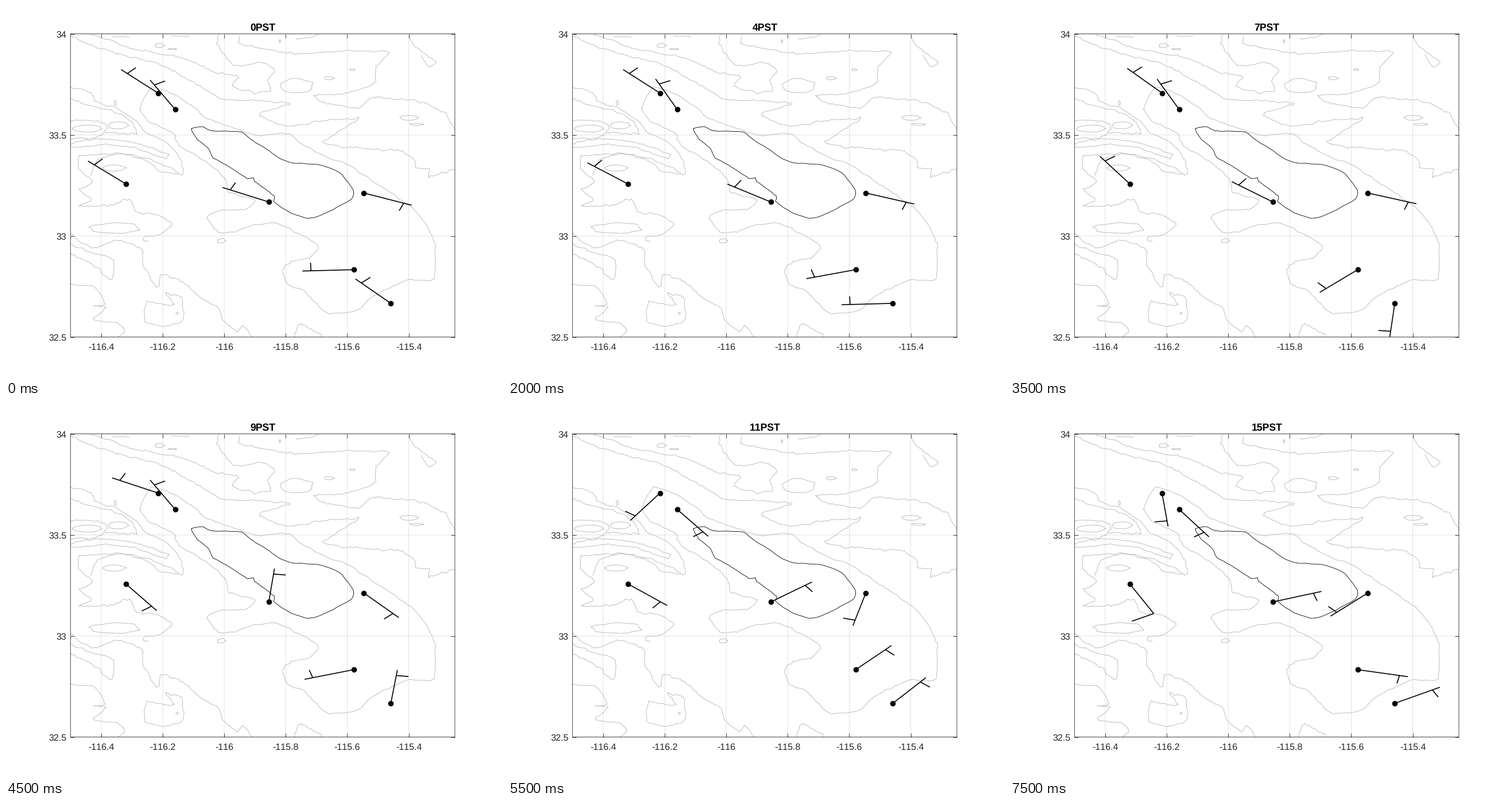
These frames come from a looping animation (864x648 px, 8000 ms). A matplotlib script:

```python
import numpy as np
import matplotlib.pyplot as plt
from matplotlib.animation import FuncAnimation

W, H, DPI = 864, 648, 100
PX = 72 / DPI
LEFT, BOTTOM, WIDE, TALL = 0.13, 0.11, 0.775, 0.815
WEST, EAST, SOUTH, NORTH = -116.5, -115.25, 32.5, 34
HOURS = 16
SHAFT = 1 / 6
THIN = 0.85 * PX
INK, GRAY = "0.15", "0.7"

plt.rcParams.update({"font.family": "Liberation Sans", "text.hinting": "none",
                     "text.kerning_factor": 6, "axes.unicode_minus": False})
rng = np.random.default_rng(4)

fig = plt.figure(figsize=(W / DPI, H / DPI), dpi=DPI, facecolor="white")
ax = fig.add_axes([LEFT, BOTTOM, WIDE, TALL])
ax.set(xlim=(WEST, EAST), ylim=(SOUTH, NORTH))


def to_degrees(points):
    x, y = points.T
    return (WEST + (x / W - LEFT) / WIDE * (EAST - WEST),
            SOUTH + (1 - y / H - BOTTOM) / TALL * (NORTH - SOUTH))


def to_pixels(lon, lat):
    return (W * (LEFT + (lon - WEST) / (EAST - WEST) * WIDE),
            H * (1 - BOTTOM - (lat - SOUTH) / (NORTH - SOUTH) * TALL))


def smooth(p, closed, step=6, pull=0.3):
    """Hermite curve through the points p, sampled about every step pixels."""
    p = np.vstack([p[-1], p, p[:2]] if closed else [p[0], p, p[-1]])
    parts = []
    for a, b, c, d in zip(p, p[1:], p[2:], p[3:]):
        n = max(1, round(np.hypot(*(c - b)) / step))
        t = np.arange(n)[:, None] / n
        parts.append(b * (1 + 2 * t) * (1 - t) ** 2 + c * t * t * (3 - 2 * t)
                     + pull * ((c - a) * t * (1 - t) ** 2 - (d - b) * t * t * (1 - t)))
    return np.vstack(parts + [p[1] if closed else p[-1]])


def contour(*xy, closed=False, color=GRAY, rough=1.0):
    points = smooth(np.reshape(xy, (-1, 2)).astype(float), closed)
    points[1:-1] += rng.normal(0, rough, points[1:-1].shape)
    ax.plot(*to_degrees(points), color=color, lw=THIN, zorder=2)


def ring(x, y, rx, ry):
    turn = np.linspace(0, 2 * np.pi, max(5, int((rx + ry) / 3)), endpoint=False)
    size = 1 + rng.uniform(-0.12, 0.12, turn.size)
    xy = np.column_stack([x + rx * size * np.cos(turn), y + ry * size * np.sin(turn)])
    contour(*xy.ravel(), closed=True, rough=0.2)


def label(x, y, text, size=16.07, **style):
    return fig.text(x / W, 1 - y / H, text, fontsize=size * PX, va="baseline", **style)


# Axes, grid and labels
lons = np.arange(-116.4, -115.3, 0.2)
lats = np.arange(32.5, 34.1, 0.5)
ax.set_xticks(lons, [])
ax.set_yticks(lats, [])
ax.set_axisbelow(True)
ax.grid(color=INK, alpha=0.15, lw=THIN, snap=False)
ax.tick_params(direction="in", top=True, right=True, length=6.7 * PX, width=THIN, color=INK)
for spine in ax.spines.values():
    spine.set(linewidth=THIN, color=INK, snap=False)
for lon in lons:
    label(to_pixels(lon, SOUTH)[0], 598.6, f"{lon:.4g}", ha="center", color=INK)
for lat in lats:
    label(105.7, to_pixels(WEST, lat)[1] + 6, f"{lat:g}", ha="right", color=INK)
title = label(447.5, 42.4, "", 17.6, ha="center", weight="bold", color="black")

# Lake shore
contour(323, 214, 342, 210, 358, 217, 410, 220, 430, 235, 449, 246, 475, 264, 497, 273,
        530, 275, 556, 279, 583, 292, 605, 321, 602, 336, 568, 355, 531, 370, 497, 361,
        480, 351, 466, 340, 467, 331, 433, 305, 431, 299, 420, 300, 384, 277, 361, 265,
        352, 247, 333, 232, closed=True, color="black", rough=0.3)

# Valley floor
contour(233, 180, 253, 142, 290, 153, 325, 175, 350, 196, 390, 210, 441, 226, 490, 222,
        515, 240, 560, 264, 595, 276, 640, 306, 705, 350, 730, 377, 747, 415, 745, 477,
        700, 477, 640, 505, 612, 530, 558, 534, 520, 497, 492, 487, 482, 460, 497, 445,
        528, 438, 545, 418, 510, 396, 470, 378, 425, 383, 400, 393, 370, 394, 350, 367,
        370, 357, 415, 354, 434, 338, 388, 325, 383, 303, 350, 272, 302, 243, 292, 222,
        252, 203, closed=True, rough=0.7)

# Northern and eastern slopes
contour(112, 51, 140, 65, 195, 83, 255, 97, 290, 113, 335, 138, 380, 163, 440, 165,
        494, 170, 442, 188, 490, 209, 560, 199, 614, 196, 590, 213, 552, 237, 600, 247,
        652, 250, 685, 252, 710, 267, 715, 281, 737, 283, 737, 298, 782, 284)
contour(150, 50, 187, 62, 228, 76, 300, 89, 337, 103, 365, 115, 405, 124, 393, 140,
        432, 151, 461, 147, 457, 130, 468, 112, 447, 98, 400, 104, 380, 85, 368, 65, 371, 50)
contour(407, 53, 404, 65, 440, 73, 507, 83, 580, 79, 667, 80, 645, 105, 640, 135,
        590, 152, 536, 156, 560, 170, 613, 178, 640, 160, 717, 165, 765, 188, 782, 218)
contour(505, 56, 530, 55, 545, 51)
contour(703, 55, 712, 70, 749, 97, 735, 106, 723, 85)
ring(507, 139, 29, 12)
ring(563, 126, 9, 3)
ring(603, 111, 5, 2)
ring(703, 195, 17, 4)
ring(714, 206, 13, 2)
ring(477, 61, 1, 3)

# Small peaks in the north-west
ring(267, 69, 9, 4)
ring(289, 75, 9, 1)
ring(190, 169, 2, 5)
contour(185, 54, 215, 54)
contour(288, 52, 318, 54)

# Western mountains
contour(112, 141, 148, 151, 155, 165, 200, 182, 232, 205, 238, 218, 283, 240, 306, 272,
        308, 294, 282, 280, 240, 264, 195, 256, 128, 262)
contour(112, 161, 145, 173, 205, 190, 228, 222, 172, 221, 155, 230, 112, 230)
contour(112, 200, 160, 200, 177, 212, 170, 219)
contour(112, 239, 165, 232, 225, 238, 283, 259, 278, 266, 222, 246, 170, 242, 112, 246)
contour(128, 260, 127, 283, 150, 307, 127, 320, 150, 336, 128, 348, 180, 347, 215, 336,
        225, 358, 265, 364, 290, 379, 270, 397, 240, 403, 248, 410)
contour(148, 295, 160, 268, 200, 257, 245, 270, 268, 288, 300, 293)
ring(195, 208, 19, 6)
ring(141, 214, 25, 6)
ring(188, 282, 19, 6)
ring(190, 387, 42, 9)
ring(375, 409, 8, 4)

# South-western hills
contour(112, 395, 128, 410, 155, 421, 195, 408, 237, 423, 238, 448, 262, 488, 270, 468,
        300, 475, 335, 505, 368, 525, 381, 550, 402, 567, 410, 559, 430, 577)
contour(112, 415, 150, 430, 187, 443, 184, 477, 171, 469, 160, 456, 112, 430)
contour(112, 485, 155, 490, 172, 520, 152, 522, 175, 525, 152, 546, 195, 553, 207, 567,
        195, 577)
contour(278, 500, 305, 508, 308, 545, 275, 559, 241, 549, 245, 515, 275, 521, 292, 520,
        closed=True)
ring(298, 535, 2, 2)
contour(503, 577, 512, 553, 541, 569, 550, 577)

# Stations: longitude, latitude, shaft direction in degrees at key hours
stations = [
    (-116.2154, 33.7075, {0: 136, 4: 136, 7: 132.8, 9: 153.3, 10: 178, 11: 234.6,
                          13: 280.8, 15: 276.8}),
    (-116.1594, 33.6262, {0: 119.3, 4: 115, 7: 115.6, 9: 119.3, 10: -51, 13: -56.6,
                          15: -54.5}),
    (-116.3203, 33.2583, {0: 137.5, 3: 149.9, 4: 141.6, 6: 138.4, 7: 125.5, 8: 128.5,
                          9: -52.8, 11: -39.9, 13: -50, 15: -62.1}),
    (-115.8552, 33.1685, {0: 154.5, 7: 143, 9: 83.6, 11: 36.4, 15: 18.2}),
    (-115.5461, 33.2128, {0: -21.2, 2: -6.5, 3: -6.5, 4: -19.1, 7: -18.6, 8: -25,
                          9: -46.9, 11: -104.6, 13: -130.6, 15: -136.6}),
    (-115.5791, 32.8335, {0: 182.3, 4: 195.5, 7: 222.3, 9: 196.6, 11: 45.7, 13: 4.7,
                          15: -12}),
    (-115.4584, 32.6670, {0: 133.6, 4: 182.4, 5: 245, 7: 264.4, 8: 275, 9: 82.6,
                          11: 49.7, 13: 34.4, 15: 28.5}),
]
STRONG_STATION, STRONG_FROM = 2, 13

barbs = [ax.plot([], [], color="black", lw=1.65 * PX, solid_capstyle="butt", zorder=4)[0]
         for _ in stations]
ax.plot([s[0] for s in stations], [s[1] for s in stations], "o", color="black",
        ms=9.6 * PX, mew=0, zorder=5)


def barb_path(lon, lat, angle, full):
    along = np.array([np.cos(np.radians(angle)), np.sin(np.radians(angle))])
    across = np.array([along[1], -along[0]])
    foot, length = (SHAFT, 0.08) if full else (SHAFT * 5 / 6, 0.04)
    origin = np.array([lon, lat])
    base = origin + along * foot
    return np.array([origin, origin + along * SHAFT, [np.nan, np.nan],
                     base, base + across * length]).T


def update(hour):
    title.set_text(f"{hour}PST")
    for i, (lon, lat, turns) in enumerate(stations):
        angle = np.interp(hour, list(turns), list(turns.values()))
        full = i == STRONG_STATION and hour >= STRONG_FROM
        barbs[i].set_data(*barb_path(lon, lat, angle, full))
    return [title, *barbs]


anim = FuncAnimation(fig, update, frames=HOURS, interval=500, repeat=True,
                     repeat_delay=0, blit=False)
plt.show()
```
